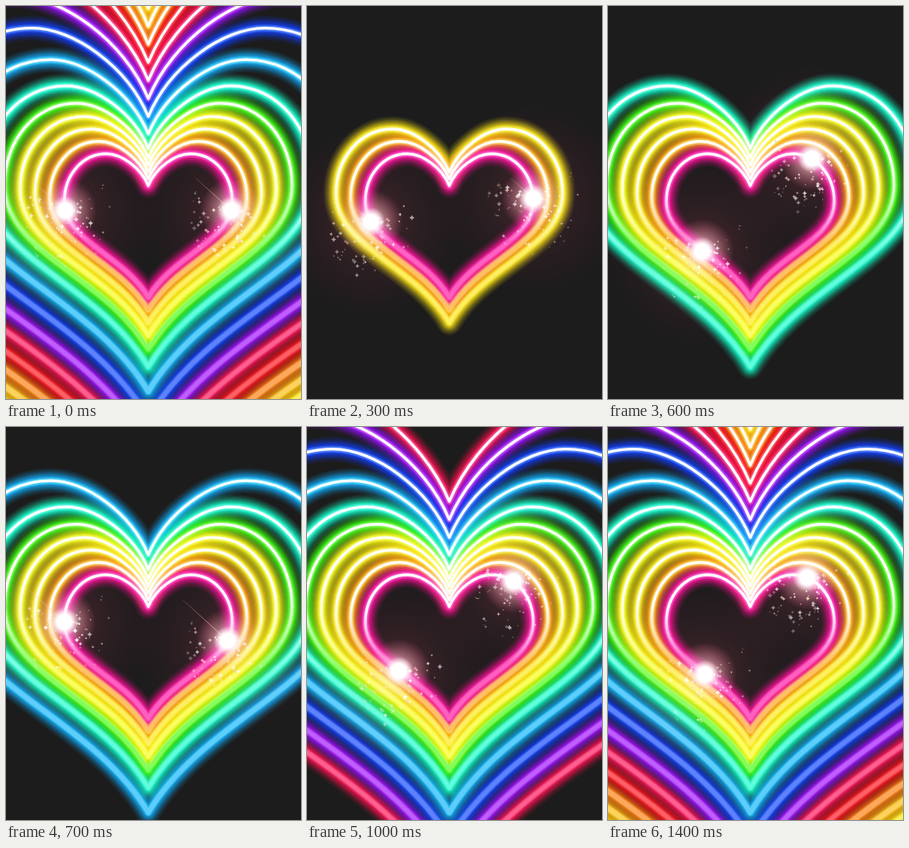
Animation, 369 px wide and 492 px high, one loop 1500 ms. Source, as an HTML page with a canvas:

```html
<!DOCTYPE html>
<html lang="en">
<head>
<meta charset="utf-8">
<title>Neon hearts</title>
<style>
html, body { margin: 0; width: 100%; height: 100%; overflow: hidden; background: #1c1c1c; }
canvas { display: block; }
</style>
</head>
<body>
<canvas id="stage" width="369" height="492"></canvas>
<script>
const ctx = document.getElementById('stage').getContext('2d');
const W = 369, H = 492, MID = 178, STEP = 100, STEPS = 15;
const RAD = Math.PI / 180;

// from the innermost heart outwards
const hues = [326, 36, 54, 62, 110, 166, 200, 228, 274, 344, 358, 26, 42, 54];
const hearts = hues.map((hue, i) => ({
  glow: `hsl(${hue} 97% 53%)`,
  tint: `hsl(${hue} 100% 69%)`,
  ...shape(halfWidth(i))
}));

// even spacing that widens smoothly around the sixth heart
function halfWidth(i) {
  return 105 + 18.3 * i + 15.2 * Math.log(1 + Math.exp(2 * (i - 5.1)));
}

function shape(w) {
  const top = 185 - 0.845 * (w - 105);
  const squash = Math.min(1, 1.108 - 0.00048 * w);
  const path = new Path2D();
  const y = v => top + w * (v > 0.57 ? 0.57 + (v - 0.57) * squash : v);
  const curve = (side, ...p) => path.bezierCurveTo(
    MID + side * w * p[0], y(p[1]), MID + side * w * p[2], y(p[3]),
    MID + side * w * p[4], y(p[5]));
  path.moveTo(MID, y(0.38));
  curve(-1, 0.09, 0.165, 0.32, 0, 0.5, 0);
  curve(-1, 0.79, 0, 1, 0.26, 1, 0.57);
  curve(-1, 1, 1.04, 0.3, 1.2, 0, 1.71);
  curve(1, 0.3, 1.2, 1, 1.04, 1, 0.57);
  curve(1, 1, 0.26, 0.79, 0, 0.5, 0);
  curve(1, 0.32, 0, 0.09, 0.165, 0, 0.38);
  path.closePath();
  return { path, top, low: y(1.05) };
}

function random(seed) {
  return () => {
    seed = (seed + 0x6d2b79f5) | 0;
    let n = Math.imul(seed ^ (seed >>> 15), 1 | seed);
    n = (n + Math.imul(n ^ (n >>> 7), 61 | n)) ^ n;
    return ((n ^ (n >>> 14)) >>> 0) / 4294967296;
  };
}

function stroke(path, style, width, alpha = 1) {
  ctx.strokeStyle = style;
  ctx.lineWidth = width;
  ctx.globalAlpha = alpha;
  ctx.stroke(path);
  ctx.globalAlpha = 1;
}

function drawGlow({ path, glow }) {
  for (let k = 0; k <= 1; k += 0.1) {
    stroke(path, glow, 32 - 24 * k, 0.05 + 0.36 * k * k);
  }
}

function drawLine({ path, top, low, tint }) {
  const core = ctx.createLinearGradient(0, top, 0, low);
  core.addColorStop(0, '#fff');
  core.addColorStop(0.38, '#fff');
  core.addColorStop(1, tint);
  ctx.globalCompositeOperation = 'screen';
  stroke(path, tint, 9, 0.3);
  stroke(path, tint, 6, 0.5);
  ctx.globalCompositeOperation = 'source-over';
  stroke(path, core, 3.4);
}

function disc(x, y, r, ...stops) {
  const g = ctx.createRadialGradient(x, y, 0, x, y, r);
  stops.forEach(([at, colour]) => g.addColorStop(at, colour));
  ctx.fillStyle = g;
  ctx.fillRect(x - r, y - r, 2 * r, 2 * r);
}

function star(x, y, r) {
  ctx.beginPath();
  for (let i = 0; i < 8; i++) {
    const a = i * Math.PI / 4, d = i % 2 ? r * 0.5 : r;
    ctx.lineTo(x + d * Math.cos(a), y + d * Math.sin(a));
  }
  ctx.fill();
}

// two turns per loop, quick at first
function sparkAngle(step) {
  const p = step / STEPS;
  return 720 * p + 32 * Math.sin(Math.PI * p ** 0.68);
}

// where a ray from the middle meets the inner heart
function onHeart(angle) {
  const dx = Math.cos(angle * RAD), dy = Math.sin(angle * RAD), cy = 256;
  let r = 0;
  while (ctx.isPointInPath(hearts[0].path, MID + r * dx, cy + r * dy)) r++;
  return [MID + r * dx, cy + r * dy];
}

function drawStreak(x, y, length) {
  const ex = x - length * 0.74, ey = y - length * 0.67;
  const fade = ctx.createLinearGradient(x, y, ex, ey);
  fade.addColorStop(0, 'rgba(255,225,225,.9)');
  fade.addColorStop(1, 'rgba(220,160,160,.2)');
  ctx.strokeStyle = fade;
  ctx.lineWidth = 1;
  ctx.beginPath();
  ctx.moveTo(x, y);
  ctx.lineTo(ex, ey);
  ctx.stroke();
}

function drawStars(x, y, seed, step) {
  const rnd = random(seed);
  const colours = ['#fff', '#ffe8e4', '#ffccd8', '#ffe0c0', '#f6a8bc', '#8ad8cc'];
  for (let i = 0; i < 85; i++) {
    const a = -0.6 + rnd() * (Math.PI + 1.2), d = 10 + 58 * rnd();
    const size = 1 + 2.4 * rnd() ** 2;
    ctx.fillStyle = colours[Math.floor(rnd() * rnd() * 6)];
    ctx.globalAlpha = (1.2 - d / 100) * (0.75 + 0.25 * Math.sin(i * 2.4 + step));
    star(x + d * 0.85 * Math.cos(a), y + d * Math.sin(a) + 3, size);
  }
  ctx.globalAlpha = 1;
}

function drawSpark(angle, seed, step) {
  const [x, y] = onHeart(angle);
  ctx.globalCompositeOperation = 'screen';
  disc(x, y, 120, [0, 'rgba(180,50,75,.3)'], [0.45, 'rgba(140,25,55,.14)'], [1, 'rgba(120,0,40,0)']);
  disc(x, y, 40, [0, 'rgba(255,225,225,1)'], [0.4, 'rgba(255,175,185,.55)'], [1, 'rgba(255,90,130,0)']);
  ctx.globalCompositeOperation = 'source-over';
  const length = 95 * Math.cos(2 * (angle - 25) * RAD);
  if (length > 0) drawStreak(x, y, length);
  drawStars(x, y, seed, step);
  disc(x, y, 18, [0, '#fff'], [0.5, '#fff'], [1, 'rgba(255,230,232,0)']);
}

function draw(step) {
  ctx.fillStyle = '#1c1c1c';
  ctx.fillRect(0, 0, W, H);
  ctx.lineJoin = 'round';
  const lit = hearts.slice(0, step || hearts.length).reverse();
  lit.forEach(drawGlow);
  lit.forEach(drawLine);
  const angle = sparkAngle(step);
  drawSpark(angle, 7, step);
  drawSpark(angle + 180, 23, step);
}

let shown = -1;
const start = performance.now();
function tick() {
  const step = Math.floor((performance.now() - start) / STEP) % STEPS;
  if (step !== shown) draw(shown = step);
  requestAnimationFrame(tick);
}
tick();
</script>
</body>
</html>
```
